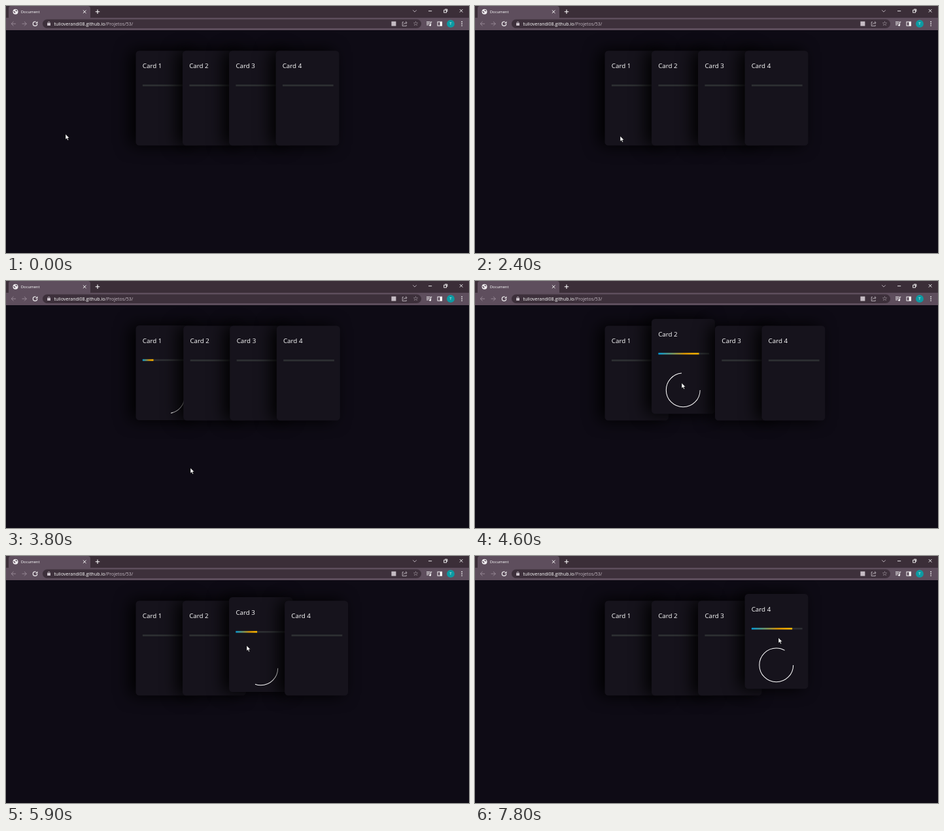
Write an HTML page that moves like this. It is 708 px wide and 378 px high and loops after 8000 ms.

```html
<!DOCTYPE html>
<html lang="en">
<head>
<meta charset="utf-8">
<title>Document</title>
<style>
html, body { margin: 0; width: 100%; height: 100%; overflow: hidden; background: #0e0b15; }
body, text { font-family: "Open Sans", "Noto Sans", sans-serif; font-weight: 500; }
#stage { position: absolute; left: 0; top: 0; width: 708px; height: 378px; overflow: hidden; }
#page { position: absolute; left: 0; top: 0; width: 1366px; height: 730px; transform: scale(.5183); transform-origin: 0 0; }
.card { position: absolute; top: 131.5px; width: 187.5px; height: 280px; border-radius: 10px; background: #16131c; box-shadow: -16px 0 48px #000; }
.card h3 { position: absolute; left: 20px; top: 33.7px; margin: 0; font-size: 18.9px; font-weight: 500; line-height: 25.5px; color: #fff; white-space: nowrap; }
.bar { position: absolute; left: 20px; top: 100px; width: 150px; height: 5px; background: #2e3033; }
.fill { height: 100%; background: linear-gradient(90deg, #009ad9 0%, #d99300 65%, #ffba00 100%); }
.card svg { position: absolute; left: calc(50% - 60px); top: 150px; fill: none; stroke: #fff; stroke-width: 2px; }
#ui { position: absolute; left: 0; top: 0; }
</style>
</head>
<body>
<div id="stage">
  <div id="page"></div>
  <svg id="ui" width="708" height="378" fill="none" stroke-width=".9">
    <defs>
      <path id="cross" d="M-2.3 -2.3L2.3 2.3M2.3 -2.3L-2.3 2.3"/>
      <path id="arrow" d="M3.5 0H-3.5M0 -3.3L-3.3 0 0 3.3"/>
    </defs>

    <!-- tab strip and toolbar -->
    <rect width="708" height="18" fill="#3b2e38"/>
    <rect y="18" width="708" height="19" fill="#5e4e5d"/>
    <rect x="4" width="125" height="24" rx="4" fill="#5e4e5d"/>
    <rect x="56" y="20.4" width="579" height="13.6" rx="6.8" fill="#3d303b"/>

    <!-- tab -->
    <circle cx="14.5" cy="8.7" r="4" fill="#f1eef1"/>
    <path stroke="#5e4e5d" stroke-width="1.5" d="M11.8 8L14 10.5M14.5 6.5L17 7.5"/>
    <text x="22.8" y="11" font-size="5.9" fill="#fff">Document</text>
    <use href="#cross" x="120.2" y="8.8" stroke="#fff"/>
    <use href="#cross" transform="translate(140 8.8) rotate(45)" stroke="#fff" stroke-width="1.1"/>

    <!-- window buttons -->
    <g stroke="#fff">
      <path d="M622.2 6.3L625 9.1 627.8 6.3" stroke="#c5bcc4"/>
      <path d="M646 7.7H651.2"/>
      <rect x="669.7" y="6.2" width="3.8" height="3.8"/>
      <path d="M671 5H674.8V8.8"/>
      <use href="#cross" x="696.1" y="7.3"/>
    </g>

    <!-- navigation -->
    <use href="#arrow" x="11.5" y="27.2" stroke="#9b8e9a"/>
    <use href="#arrow" transform="translate(28 27.2) scale(-1 1)" stroke="#9b8e9a"/>
    <circle cx="44.5" cy="27.2" r="3.2" stroke="#fff" stroke-width="1.1" stroke-dasharray="16 4"/>
    <path fill="#fff" d="M48.3 23.4V26.6H45.1Z"/>

    <!-- address -->
    <rect x="63.1" y="26.1" width="4.9" height="3.9" fill="#cfc7ce"/>
    <circle cx="65.55" cy="25.6" r="1.4" stroke="#cfc7ce" stroke-width=".8"/>
    <text x="73.5" y="29.7" font-size="7.05" fill="#fff">tulioverandi08.github.io<tspan fill="#c2b8c1">/Projetos/53/</tspan></text>
    <rect x="589.4" y="23.6" width="7" height="7" fill="#c5bcc4"/>
    <path stroke="#cfc7ce" stroke-width=".8" d="M608 24.6H606.2V30.6H612.2V29M608 28.4Q608.3 25.8 612.5 25.6M611 23.6L613.2 25.6 611 27.6"/>
    <text x="626.5" y="30.3" font-size="9.5" fill="#e0d9df" text-anchor="middle" style="font-family: 'DejaVu Sans', sans-serif">☆</text>
    <path stroke="#fff" d="M643 24.4H648.6M643 26.6H648.6M643 28.8H646.4M649.6 29.4V24.4H651.3"/>
    <circle cx="648.6" cy="29.4" r="1.4" fill="#fff"/>
    <rect x="660" y="24.2" width="6.6" height="6" stroke="#fff"/>
    <rect x="663.6" y="24.2" width="3" height="6" fill="#fff"/>
    <circle cx="680" cy="27.2" r="5.9" fill="#0c9ba3"/>
    <text x="680" y="29.4" font-size="6" fill="#fff" text-anchor="middle">T</text>
    <path stroke="#fff" stroke-width="1.5" stroke-dasharray="1.4 1.5" d="M697.1 23.6V31"/>

    <path id="cursor" fill="#fff" stroke="#000" stroke-width=".5" d="M0 0V8.3L1.9 6.6 3.2 9.5 4.6 8.9 3.3 6.1H5.8Z"/>
  </svg>
</div>
<script>
const LOOP = 8000, STEP = 100;

// When the pointer enters and leaves each card
const hovers = [[2430, 3470], [4170, 5040], [5755, 6620], [7180, LOOP]];

// Pointer stops: arrival time, travel time, x, y
const stops = [
  [0, 0, 91, 196], [300, 0, 588, 189], [1700, 300, 529, 258], [2200, 300, 245, 278],
  [2400, 100, 222, 199], [3800, 400, 282, 286], [4600, 500, 316, 156], [5400, 400, 340, 255],
  [5900, 300, 368, 137], [6700, 200, 420, 265], [7400, 500, 464, 125]
];

const page = document.getElementById('page');
const cursor = document.getElementById('cursor');
const cards = hovers.map(([enter, leave], i) => {
  const el = document.createElement('div');
  el.className = 'card';
  el.style.left = 383 + 137.5 * i + 'px';
  el.innerHTML = `<h3>Card ${i + 1}</h3><div class="bar"><div class="fill"></div></div>
    <svg width="120" height="120"><circle cx="60" cy="60" r="50" stroke-dasharray="360"/></svg>`;
  page.append(el);
  return { el, enter, leave, fill: el.querySelector('.fill'), ring: el.querySelector('circle') };
});

const clamp = x => Math.min(1, Math.max(0, x));
const mix = (a, b, k) => a + (b - a) * k;
const smooth = k => k * k * (3 - 2 * k);

// cubic-bezier(0, 0, .58, 1), solved for its parameter by bisection
function easeOut(x) {
  let lo = 0, hi = 1;
  for (let i = 0; i < 24; i++) {
    const u = (lo + hi) / 2;
    if (u * u * (1.74 - .74 * u) < x) lo = u; else hi = u;
  }
  return smooth(lo);
}

function hover({ enter, leave }, t, inMs, outMs = inMs) {
  return easeOut(clamp((t - enter) / inMs)) - easeOut(clamp((t - leave) / outMs));
}

function pointer(t) {
  let x = 0, y = 0;
  for (const [arrive, travel, toX, toY] of stops) {
    if (t < arrive - travel) break;
    const k = travel ? smooth(clamp((t - arrive + travel) / travel)) : 1;
    x = mix(x, toX, k);
    y = mix(y, toY, k);
  }
  return [x, y];
}

function draw(t) {
  let shift = 0;
  for (const card of cards) {
    const lift = hover(card, t, 400);
    card.el.style.transform = `translate(${50 * shift}px, ${-20 * lift}px)`;
    card.fill.style.width = 120 * hover(card, t, 400, 600) + 'px';
    card.ring.style.strokeDashoffset = 360 - 260 * hover(card, t, 600);
    shift += lift;
  }
  cursor.setAttribute('transform', `translate(${pointer(t)})`);
}

const start = performance.now();
function tick() {
  const t = (performance.now() - start) % LOOP;
  draw(Math.floor(t / STEP) * STEP);
  requestAnimationFrame(tick);
}
tick();
</script>
</body>
</html>
```
